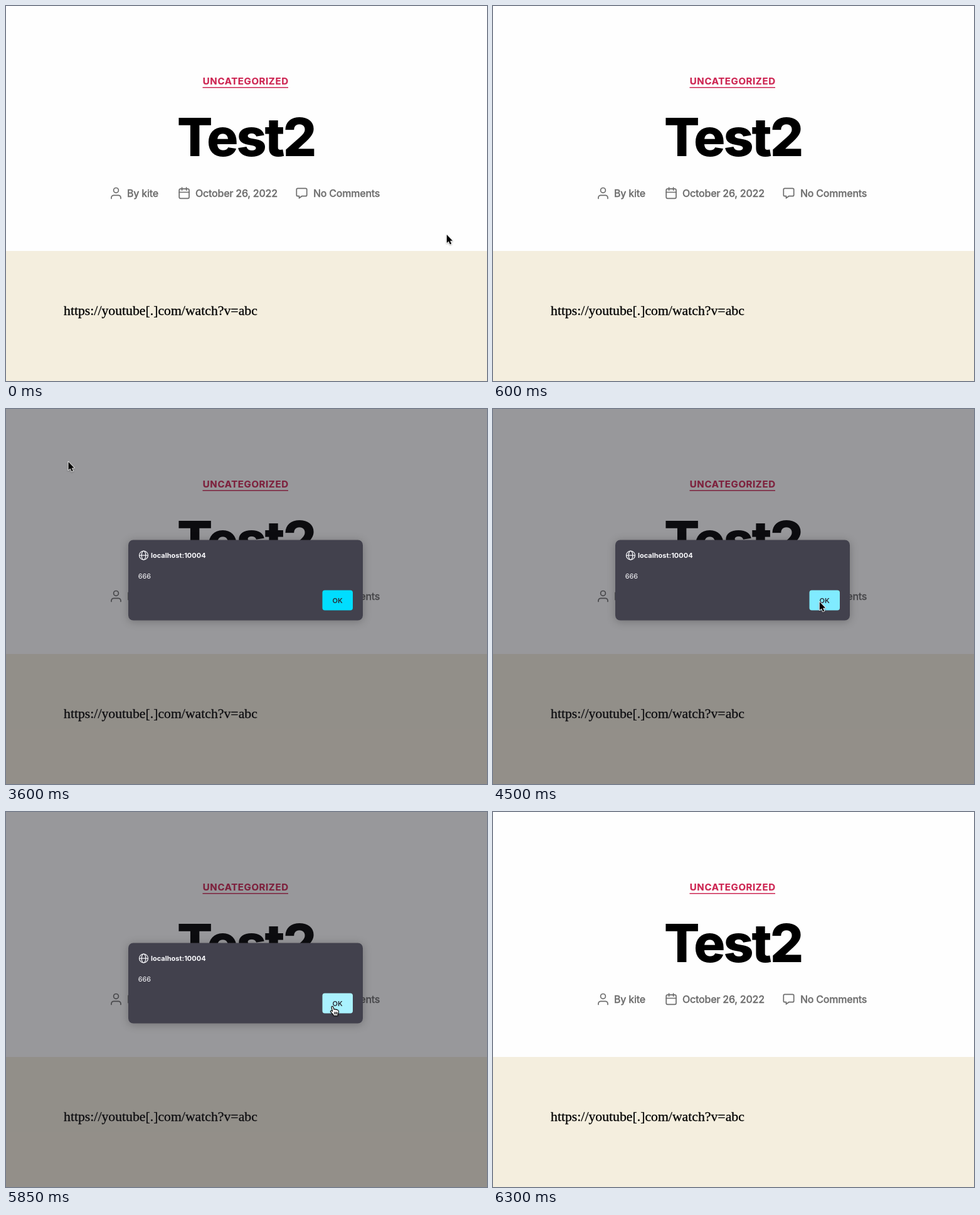
An HTML page that plays this animation: 767 by 597 pixels, repeating every 7200 ms.

```html
<!DOCTYPE html>
<html lang="en">
<head>
<meta charset="utf-8">
<title>Post with alert</title>
<style>
html, body { margin: 0; width: 100%; height: 100%; overflow: hidden; background: #fff; }
svg { display: block; width: 767px; height: 597px; font-family: Inter, sans-serif; }

.category { font-size: 15px; font-weight: 700; letter-spacing: .041em; fill: #cd2653; stroke: #cd2653; stroke-width: .2px; text-anchor: middle; }
.title { font-size: 84px; font-weight: 800; letter-spacing: -.036em; text-anchor: middle; }
.meta { font-size: 16px; font-weight: 500; letter-spacing: -.0145em; fill: #6d6d6d; }
.meta text { stroke: #6d6d6d; stroke-width: .3px; }
.icons { fill: none; stroke: #6d6d6d; stroke-width: 1.7; stroke-linecap: round; stroke-linejoin: round; }
.body { font: 21.75px "Liberation Serif", serif; stroke: #000; stroke-width: .3px; }

.panel { fill: #42414d; filter: drop-shadow(0 2px 7px rgba(0, 0, 0, .24)); }
.dialog text { font-size: 11px; fill: #fbfbfe; }
.dialog .host { font-weight: 700; }
.dialog .ok { font-weight: 600; fill: #2b2a33; text-anchor: middle; }
.globe { fill: none; stroke: #fbfbfe; stroke-width: 1.2; }

.arrow, .hand { stroke-linejoin: round; filter: drop-shadow(0 1px 1px rgba(0, 0, 0, .3)); }
.arrow path { fill: #000; stroke: #fff; stroke-width: 1.8; paint-order: stroke; }
.hand path { fill: #fff; stroke: #000; stroke-width: 1.1; stroke-linecap: round; }

.dialog, .button, .hover, .arrow, .hand { animation: 7.2s step-end infinite; }
.dialog { animation-name: dialog; }
.button { animation-name: button; }
.hover { animation-name: hover; }
.arrow { animation-name: arrow; }
.hand { animation-name: hand; }

@keyframes dialog {
  0%, 83.333% { visibility: hidden; }
  35.416% { visibility: visible; }
}
@keyframes button {
  0% { fill: #00ddff; }
  58.333% { fill: #80ebff; }
  79.166% { fill: #aaf2ff; }
}
@keyframes hover {
  0%, 87.5% { visibility: hidden; }
  83.333% { visibility: visible; }
}
@keyframes arrow {
  0% { visibility: visible; transform: translate(702.8px, 364px); }
  6.25% { visibility: visible; transform: translate(703.3px, 364.8px); }
  8.333% { visibility: hidden; transform: translate(99.5px, 84px); }
  50% { visibility: visible; transform: translate(99.5px, 84px); }
  52.083% { visibility: visible; transform: translate(410.3px, 282px); }
  56.25% { visibility: visible; transform: translate(487.3px, 289.3px); }
  58.333% { visibility: visible; transform: translate(513.5px, 307px); }
  60.416% { visibility: visible; transform: translate(519.8px, 307px); }
  62.5% { visibility: visible; transform: translate(520.8px, 307px); }
  81.25%, 100% { visibility: hidden; transform: translate(520.8px, 307px); }
}
@keyframes hand {
  0% { visibility: hidden; transform: translate(516px, 308px); }
  81.25% { visibility: visible; transform: translate(516px, 308px); }
  85.416% { visibility: visible; transform: translate(537px, 331px); }
  87.5%, 100% { visibility: hidden; transform: translate(537px, 331px); }
}
</style>
</head>
<body>
<svg viewBox="0 0 767 597">
  <rect width="767" height="597" fill="#fefefe"/>
  <rect y="390" width="767" height="207" fill="#f4eede"/>

  <text class="category" x="382.2" y="125">UNCATEGORIZED</text>
  <rect x="313.5" y="129" width="136.5" height="1.5" fill="#cd2653"/>
  <text class="title" x="382.5" y="238.5">Test2</text>

  <g class="icons">
    <circle cx="175.5" cy="293.4" r="3.9"/>
    <path d="M168 306.5v-1.2a4 4 0 0 1 4-4h7a4 4 0 0 1 4 4v1.2"/>
    <rect x="276.2" y="291.2" width="15.8" height="15.2" rx="2.2"/>
    <path d="M276.2 296.5H292M280.6 289v4.2M287.6 289v4.2"/>
    <path d="M465.3 290.3h12.4a2 2 0 0 1 2 2v8.4a2 2 0 0 1-2 2h-6l-4.2 3.2v-3.2h-2.2a2 2 0 0 1-2-2v-8.4a2 2 0 0 1 2-2z"/>
  </g>
  <g class="meta">
    <text x="193" y="303.5">By kite</text>
    <text x="302" y="303.5">October 26, 2022</text>
    <text x="490" y="303.5">No Comments</text>
    <rect class="hover" x="490.5" y="306" width="106" height="1"/>
  </g>

  <text class="body" x="92" y="492.3">https://youtube[.]com/watch?v=abc</text>

  <g class="dialog">
    <rect width="767" height="597" fill="#1c1b22" fill-opacity=".45"/>
    <rect class="panel" x="195" y="208.5" width="374" height="128" rx="8"/>
    <g class="globe">
      <circle cx="219.5" cy="233" r="7"/>
      <ellipse cx="219.5" cy="233" rx="3.3" ry="7"/>
      <path d="M212.5 233h14"/>
    </g>
    <text class="host" x="231" y="236.5">localhost:10004</text>
    <text x="210.7" y="270">666</text>
    <rect class="button" x="504.5" y="288.5" width="48.5" height="32" rx="4"/>
    <text class="ok" x="528.7" y="309">OK</text>
  </g>

  <g class="arrow">
    <path d="M0 0V13.2L3 10.4 5.2 15.4 7.4 14.4 5.3 9.7H9.3Z"/>
  </g>
  <g class="hand">
    <path d="M4.6 9.3 3.2 3.2C2.7 1.2 4.9.5 5.6 2.3L7.2 6.6C7.7 5.4 9.4 5.5 9.7 6.9 10.3 5.9 11.8 6.2 12.1 7.5 13 6.9 14.1 7.4 14.2 8.6 14.6 10.5 14.3 12.2 13.2 14L13 16.3H6.6C6.2 14.3 3.8 12.6 1.8 10.1.6 8.5 2.4 7.4 4.6 9.3Z"/>
    <path d="M7.8 10.6v3.2M9.8 10.6v3.2M11.7 10.6v3.2"/>
  </g>
</svg>
</body>
</html>
```
